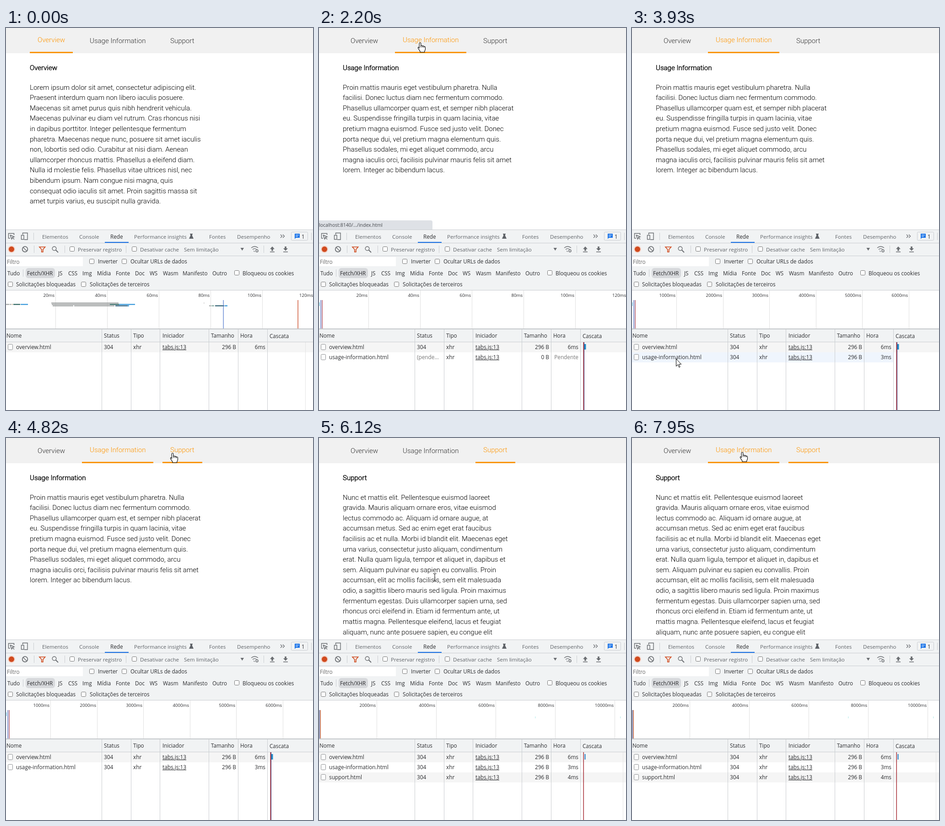
An HTML page that plays this animation: 671 by 834 pixels, repeating every 8000 ms.

```html
<!DOCTYPE html>
<html lang="pt">
<head>
<meta charset="utf-8">
<title>Tabs</title>
<style>
html, body { margin: 0; width: 100%; height: 100%; overflow: hidden; background: #fff; }
svg { display: block; width: 671px; height: 834px; }
text { white-space: pre; }
.page { font: 300 15.05px Roboto, sans-serif; }
.page .head { stroke: #000; stroke-width: .5px; }
.ui { font: 11.7px "Open Sans", "Noto Sans", sans-serif; fill: #2b2c2f; }
.tab { font-size: 11.6px; fill: #5f6368; }
.tick { font-size: 9.6px; }
.row { font-size: 11.8px; }
.tip { font-size: 10.5px; fill: #45484d; }
.line { fill: none; stroke: #6a6d71; stroke-width: 1.4; }
</style>
</head>
<body>
<svg id="stage" viewBox="0 0 671 834" xmlns="http://www.w3.org/2000/svg">
  <g id="nav" class="page"></g>
  <g id="copy" class="page"></g>
  <g id="bubble" class="ui">
    <path d="M0 420H244q4 0 4 4V440H0z" fill="#dee1e6"/>
    <text class="tip" x="0" y="434">localhost:8140/.../index.html</text>
  </g>
  <g id="tools" class="ui"></g>
  <g id="net" class="ui"></g>
  <g id="cursor"></g>
</svg>
<script>
const LOOP = 8000;
const $ = id => document.getElementById(id);
const text = (x, y, s, more = '') => `<text x="${x}" y="${y}" ${more}>${s}</text>`;
const rect = (x, y, w, h, fill, more = '') =>
  `<rect x="${x}" y="${y}" width="${w}" height="${h}" fill="${fill}" ${more}/>`;
const path = (d, more = 'class="line"') => `<path d="${d}" ${more}/>`;
const box = (x, y) => rect(x - 4.5, y - 4.5, 10, 10, '#fff', 'rx="2" stroke="#767676"');
const GREY = '#cacdd1', SOLID = 'fill="#6a6d71"', LEADING = 22.62;

const TABS = [
  { name: 'Overview', x: 52, w: 94, tx: 69, lines: [
    'Lorem ipsum dolor sit amet, consectetur adipiscing elit.',
    'Praesent interdum quam non libero iaculis posuere.',
    'Maecenas sit amet purus quis nibh hendrerit vehicula.',
    'Maecenas pulvinar eu diam vel rutrum. Cras rhoncus nisi',
    'in dapibus porttitor. Integer pellentesque fermentum',
    'pharetra. Maecenas neque nunc, posuere sit amet iaculis',
    'non, lobortis sed odio. Curabitur at nisi diam. Aenean',
    'ullamcorper rhoncus mattis. Phasellus a eleifend diam.',
    'Nulla id molestie felis. Phasellus vitae ultrices nisl, nec',
    'bibendum ipsum. Nam congue nisi magna, quis',
    'consequat odio iaculis sit amet. Proin sagittis massa sit',
    'amet turpis varius, eu suscipit nulla gravida.'] },
  { name: 'Usage Information', x: 166, w: 156, tx: 183, lines: [
    'Proin mattis mauris eget vestibulum pharetra. Nulla',
    'facilisi. Donec luctus diam nec fermentum commodo.',
    'Phasellus ullamcorper quam est, et semper nibh placerat',
    'eu. Suspendisse fringilla turpis in quam lacinia, vitae',
    'pretium magna euismod. Fusce sed justo velit. Donec',
    'porta neque dui, vel pretium magna elementum quis.',
    'Phasellus sodales, mi eget aliquet commodo, arcu',
    'magna iaculis orci, facilisis pulvinar mauris felis sit amet',
    'lorem. Integer ac bibendum lacus.'] },
  { name: 'Support', x: 342, w: 87, tx: 359, lines: [
    'Nunc et mattis elit. Pellentesque euismod laoreet',
    'gravida. Mauris aliquam ornare eros, vitae euismod',
    'lectus commodo ac. Aliquam id ornare augue, at',
    'accumsan metus. Sed ac enim eget erat faucibus',
    'facilisis ac et nulla. Morbi id blandit elit. Maecenas eget',
    'urna varius, consectetur justo aliquam, condimentum',
    'erat. Nulla quam ligula, tempor et aliquet in, dapibus et',
    'sem. Aliquam pulvinar eu sapien eu convallis. Proin',
    'accumsan, elit ac mollis facilisis, sem elit malesuada',
    'odio, a sagittis libero mauris sed ligula. Proin maximus',
    'fermentum egestas. Duis ullamcorper sapien urna, sed',
    'rhoncus orci eleifend in. Etiam id fermentum ante, ut',
    'mattis magna. Pellentesque eleifend, lacus et feugiat',
    'aliquam, nunc ante posuere sapien, eu congue elit'] }
];

// Pointer runs: start, end, steps, then [step, x, y] waypoints.
const MOVES = [
  [240, 1000, 12, [[1, 613, 792], [5, 500, 520], [9, 270, 205], [12, 193, 96]]],
  [1070, 1740, 10, [[0, 193, 96], [2, 208, 64], [3, 216, 39], [6, 219, 35], [10, 221, 32]]],
  [2530, 3320, 12, [[0, 221, 32], [4, 190, 230], [9, 120, 660], [11, 92, 716], [12, 84, 723]]],
  [3400, 3930, 7, [[0, 84, 723], [2, 79, 724], [4, 99, 725], [7, 96, 722]]],
  [4130, 4820, 11, [[0, 96, 722], [2, 130, 650], [7, 330, 160], [10, 362, 45], [11, 364, 33]]],
  [5420, 6120, 11, [[0, 364, 33], [3, 330, 110], [8, 258, 280], [11, 253, 304]]],
  [6980, 7740, 11, [[0, 253, 304], [2, 254, 310], [8, 240, 110], [11, 229, 46]]],
  [7810, 7950, 3, [[0, 229, 46], [3, 241, 31]]]
];
// Timed switches: [from, value].
const ACTIVE = [[0, 0], [2070, 1], [4950, 2]];
const NET = [[0, 0], [2200, 1], [2270, 2], [5090, 3], [5160, 4]];
const TIP = [[0, 0], [1740, .1], [2070, 1], [2670, .5], [2740, 0],
  [4950, 1], [5560, .5], [5630, 0]];

const SHAPES = {
  arrow: path('M.5.5v16l3.7-3.6 2.7 6 2.2-1-2.6-5.8h5.2z', 'fill="#fff" stroke="#000"'),
  beam: path('M-3.5-8h2.5l1 1 1-1h2.5M0-7v14M-3.5 8h2.5l1-1 1 1h2.5', 'fill="none" stroke="#000"'),
  hand: path('M0 0c1.2 0 1.8.8 1.8 2v5c.4-.5 1-.7 1.6-.7 1 0 1.6.5 1.8 1.2.4-.3.9-.4 1.4-.4 1 0 1.6.6 1.8 1.4' +
    '.3-.2.7-.3 1.1-.3 1.2 0 1.9.9 1.9 2v4c0 2-1.6 3.6-1.8 5v1.5H0v-1.5c-.5-2-2.5-3.6-3.8-6' +
    '-.9-1.5-1.2-2.3-.6-3 .7-.7 1.4-.3 2.2.8l.4.6V2C-1.8.8-1.2 0 0 0z' +
    'M1.8 7v3.5M5.2 7.5v3M8.4 8.5v2.5', 'fill="#fff" stroke="#000" stroke-width="1.1"')
};

const pick = (table, t) => table.filter(e => e[0] <= t).pop()[1];

function pointer(t) {
  const run = MOVES.filter(m => m[0] <= t).pop();
  if (!run) return null;
  const [from, to, n, pts] = run;
  const k = Math.min(n, Math.floor((t - from + 15) / ((to - from) / (n - 1))) + 1);
  const i = Math.max(1, pts.findIndex(p => p[0] >= k));
  const [a, b] = [pts[i - 1], pts[i]];
  const u = (k - a[0]) / (b[0] - a[0]);
  return { x: Math.round(a[1] + (b[1] - a[1]) * u), y: Math.round(a[2] + (b[2] - a[2]) * u) };
}

function navView(active, over) {
  return rect(0, 0, 671, 55, '#f1f1f1') + TABS.map((b, i) => {
    const hot = i === active || i === over;
    return text(b.tx, hot ? 31 : 33, b.name, `fill="${hot ? '#ff9500' : '#333'}"`) +
      (hot ? rect(b.x, 52, b.w, 3, '#f99500') : '');
  }).join('');
}

const copyView = i => text(52, 92, TABS[i].name, 'class="head"') +
  TABS[i].lines.map((s, n) => text(52, 135 + Math.floor(n * LEADING), s)).join('');

function toolsView() {
  const words = (y, list, more) => list.map(([x, s]) => text(x, y, s, more)).join('');
  const seps = (y, xs) => xs.map(x => rect(x, y, 1, 16, GREY)).join('');
  const ruler = [440, 469, 497, 572].map(y => rect(0, y, 671, 1, GREY)).join('');
  return rect(0, 440, 671, 133, '#f1f3f4') + ruler +
    path('M9 459H5.5V448.5H17.5V452M9 452l9 4-4 1.3 4 4.2M9 452l3.5 9 1.5-3.7') +
    path('M36.5 451V447.5H47V462H40M33.5 452.5h5.5v9h-5.5z') +
    seps(447, [60, 667]) +
    words(460, [[79, 'Elementos'], [160, 'Console'], [280, 'Performance insights'],
      [444, 'Fontes'], [505, 'Desempenho']], 'class="tab"') +
    text(228, 460, 'Rede') + rect(216, 467, 52, 2, '#1a73e8') +
    path('M402 449h6v1.5h-1v3l3 6.5h-10l3-6.5v-3h-1z', 'fill="#5f6368"') +
    path('M600 451l3.5 3.5-3.5 3.5M605 451l3.5 3.5-3.5 3.5') +
    rect(623.5, 445.5, 36, 18, '#f1f3f4', `rx="2" stroke="${GREY}"`) +
    path('M631 449h11v9h-8.5l-2.5 2.5z', 'fill="#1a73e8"') +
    path('M633 452h7M633 455h5', 'stroke="#fff"') + text(646, 460, '1') +
    // network toolbar
    '<circle cx="12" cy="483" r="8" fill="#f5d5c9"/><circle cx="12" cy="483" r="6" fill="#d04a1e"/>' +
    '<circle cx="41.5" cy="483" r="5.8" class="line" style="stroke-width:1.8"/>' +
    path('M37.5 479l8 8') + seps(475, [61, 128, 262, 563]) +
    path('M73 478h12.5l-4.7 5.5v5.5h-3v-5.5z', 'fill="none" stroke="#d04a1e" stroke-width="1.7"') +
    '<circle cx="105.5" cy="481.5" r="4.3" class="line"/>' +
    path('M108.5 484.5l5.5 5.5', 'class="line" style="stroke-width:2"') +
    box(144, 482) + box(280, 482) +
    words(488, [[157, 'Preservar registro'], [293, 'Desativar cache'], [389, 'Sem limitação']], 'class="tab"') +
    path('M512.5 480h7.5l-3.7 6z', SOLID) +
    path('M536 480q7.5-6 15 0M539 483.5q4.5-3.5 8.5-.5M541.5 486.5l2 2') +
    '<circle cx="548.5" cy="486.5" r="2.5" class="line"/>' +
    path('M582 477l5 5.5h-3.2v4h-3.6v-4h-3.2zM577 488h10v1.5h-10z', SOLID) +
    path('M611 486.5l5-5.5h-3.2v-4h-3.6v4h-3.2zM606 488h10v1.5h-10z', SOLID) +
    // filters
    rect(0, 500, 168, 20, '#fff') + text(2, 515, 'Filtro', 'fill="#666"') +
    box(187, 509) + box(258, 509) + words(514, [[201, 'Inverter'], [272, 'Ocultar URLs de dados']]) +
    seps(527, [37]) + rect(43, 524, 64, 22, '#d7d9dc', 'rx="6"') + box(504, 534) +
    words(540, [[3, 'Tudo'], [46, 'Fetch/XHR'], [114, 'JS'], [136, 'CSS'], [167, 'Img'], [199, 'Mídia'],
      [240, 'Fonte'], [282, 'Doc'], [314, 'WS'], [343, 'Wasm'], [386, 'Manifesto'], [451, 'Outro'],
      [517, 'Bloqueou os cookies']]) +
    box(9, 559) + box(169, 559) +
    words(564, [[22, 'Solicitações bloqueadas'], [183, 'Solicitações de terceiros']]);
}

function chart(net) {
  const [step, gap, first] = net < 2 ? [20, 113, 108] : net < 4 ? [1000, 101.6, 97.5] : [2000, 130, 126];
  let s = rect(0, 573, 671, 83, '#fff');
  for (let i = 0; i < 6; i++) {
    const x = Math.floor(first + i * gap);
    s += rect(x, 573, 1, 83, '#e0e0e0') +
      text(x - 2, 587, (i + 1) * step + 'ms', 'class="tick" text-anchor="end"');
  }
  const bars = (y, list) => list.map(([x, w, c]) => rect(x, y, w, 2, c)).join('');
  const ash = '#9a9d9d', teal = '#17544f', blue = '#1f8bd6';
  const mark = (x, c) => rect(x, 594, 1.3, 62, c);
  if (!net) {
    s += bars(602.5, [[0, 7, ash], [8, 3, ash], [12, 3, '#c9b79a'], [16, 15, teal], [32, 16, blue]]) +
      bars(599.5, [[99, 147, ash]]) + bars(602.5, [[100, 127, ash], [227, 20, teal], [247, 35, blue]]) +
      bars(605.5, [[102, 45, ash], [149, 88, ash], [239, 27, '#174e72'], [266, 3, blue]]) +
      bars(605.5, [[444, 4, ash], [449, 6, '#7fa59b'], [457, 20, '#174e62'], [478, 6, blue]]) +
      rect(432, 599, 1.5, 3, '#d6d6d6') + mark(474.5, '#5a7fd0') + mark(637.5, '#c9431f');
  } else if (net < 4) {
    s += rect(0, 599, 1.5, 8, '#7cc8e8') + mark(3.5, '#4a63b8') + mark(6.5, '#a84458');
  } else {
    s += mark(.5, '#5368a8') + mark(2.5, '#c9531f') +
      rect(472, 608, 1.5, 4, '#c8f0ee') + rect(658, 608, 1.5, 4, '#c8f0ee');
  }
  return s + rect(0, 656, 671, 2, '#c4c7ca');
}

function netView(net, over) {
  const count = net ? net < 3 ? 2 : 3 : 1;
  const right = 'text-anchor="end"';
  let s = chart(net) + rect(0, 658, 671, 176, '#fff') + rect(0, 658, 671, 28, '#f1f3f4');
  const rows = [['overview.html', '6ms'], ['usage-information.html', '3ms'], ['support.html', '4ms']];
  let cells = '';
  rows.slice(0, count).forEach(([name, time], i) => {
    const y = 686 + i * 22, base = y + 15;
    const wait = net % 2 && i === count - 1;
    if (i % 2 === 0) s += rect(0, y, 671, 22, '#f5f5f5');
    if (i === over) s += rect(0, y, 571, 22, '#eff5fd');
    const dim = wait ? 'fill="#777"' : '';
    cells += rect(4.5, y + 4.5, 10, 12, '#fff', 'rx="2" stroke="#8a8d90"') + text(22, base, name) +
      text(214, base, wait ? '(pende...' : '304', dim) + text(278, base, 'xhr') +
      text(342, base, 'tabs.js:13', 'text-decoration="underline"') +
      text(503, base, wait ? '0 B' : '296 B', right) +
      text(567, base, wait ? 'Pendente' : time, right + ' ' + dim);
  });
  if (!net || net === 4) s += rect(net ? 664 : 654, 686, 1, 148, '#e4e4e4');
  s += rect(0, 685, 671, 1, GREY);
  for (const x of [209, 273, 336, 443, 507, 571]) s += rect(x, 658, 1, 176, GREY);
  if (net) {
    s += net < 4 ? rect(580, 690, 3.5, 12, '#1f8bc8') + rect(579, 686, 1, 148, '#4a4a88')
      : rect(580.5, 690, 2, 12, '#1f7fc8');
    s += rect(577.5, 686, 1.5, 148, '#a83038');
  }
  const heads = [[1, 'Nome'], [214, 'Status'], [278, 'Tipo'], [342, 'Iniciador'], [448, 'Tamanho'],
    [512, 'Hora'], [576, 'Cascata']];
  return s + heads.map(([x, h]) => text(x, x > 570 ? 677 : 676, h)).join('') + `<g class="row">${cells}</g>`;
}

const seen = {};
function show(id, view, ...args) {
  const key = args.join();
  if (seen[id] === key) return;
  seen[id] = key;
  $(id).innerHTML = view(...args);
}

function draw(t) {
  const p = pointer(t), active = pick(ACTIVE, t), net = pick(NET, t);
  let tab = -1, row = -1, kind = '';
  if (p) {
    const bottom = 119 + TABS[active].lines.length * LEADING;
    if (p.y < 55) tab = TABS.findIndex(b => p.x >= b.x && p.x <= b.x + b.w);
    if (p.y >= 686) row = Math.floor((p.y - 686) / 22);
    const onText = p.x > 52 && p.x < 430 && p.y > 118 && p.y < Math.min(440, bottom);
    kind = tab >= 0 ? 'hand' : onText ? 'beam' : 'arrow';
    $('cursor').setAttribute('transform', `translate(${p.x} ${p.y})`);
  }
  show('cursor', k => SHAPES[k] || '', kind);
  show('nav', navView, active, tab);
  show('copy', copyView, active);
  show('net', netView, net, row);
  $('bubble').setAttribute('opacity', pick(TIP, t));
}

$('tools').innerHTML = toolsView();
const start = performance.now();
function tick() {
  draw((performance.now() - start) % LOOP);
  requestAnimationFrame(tick);
}
tick();
</script>
</body>
</html>
```
